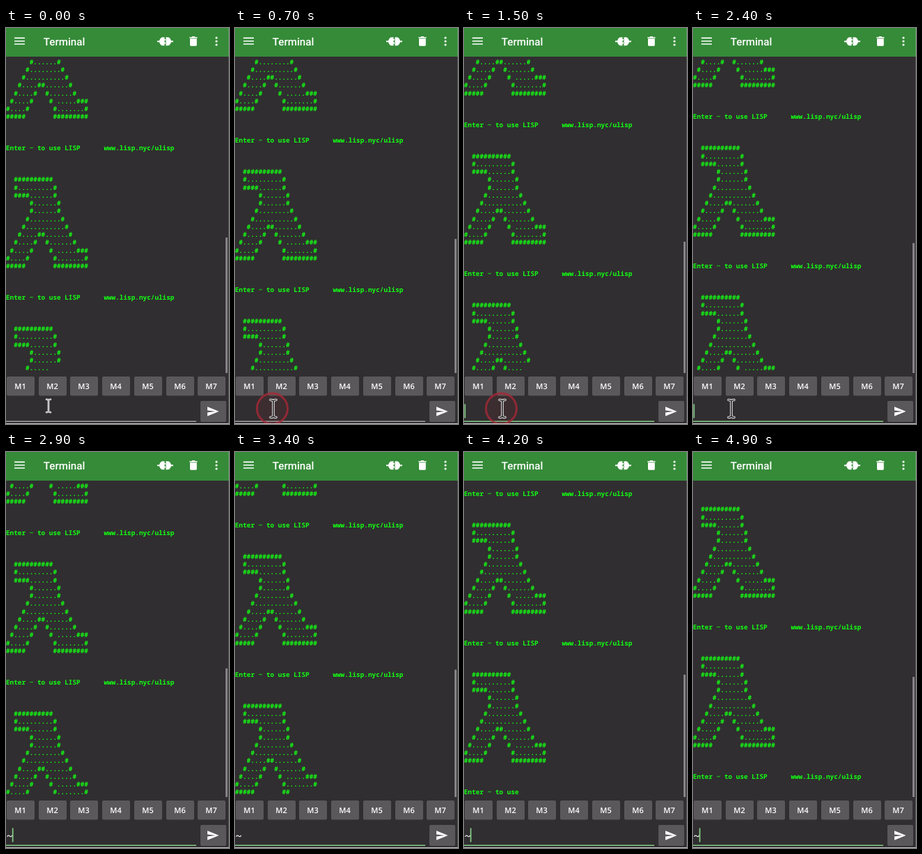
An HTML page that plays this animation: 320x567 px, repeating every 5000 ms.

```html
<!DOCTYPE html>
<html lang="en">
<head>
<meta charset="utf-8">
<title>Terminal</title>
<style>
  html, body { margin: 0; width: 100%; height: 100%; overflow: hidden; background: #302e30; }
  body { position: relative; }
  pre {
    position: absolute; left: 0; top: 42.6px; margin: 0; color: #14ff14;
    font: 600 9.375px/11.25px "Noto Sans Mono", "DejaVu Sans Mono", monospace;
    text-rendering: geometricPrecision;
  }
  svg { position: absolute; left: 0; top: 0; }
  text { fill: #fff; text-rendering: geometricPrecision; }
  #title { font: 500 15.2px Roboto, sans-serif; }
  #keys text { font: 600 11px "Open Sans", sans-serif; }
  #typed { font: 14px Roboto, sans-serif; }
</style>
</head>
<body>
<pre id="term"></pre>
<svg width="320" height="567" viewBox="0 0 320 567">
  <defs>
    <path id="beam" d="M-4-12.500q3.500 0 4 2q.5-2 4-2M0-10.500v21M-4 12.500q3.500 0 4-2q.5 2 4 2"/>
  </defs>
  <rect width="320" height="41" fill="#358b38"/>
  <g fill="#fff">
    <path d="M12 13.600h15v1.600H12zM12 17.900h15v1.600H12zM12 22.200h15v1.600H12z"/>
    <path d="M217 18.200h3q1.500-5 5-5h2.500v12H225q-3.500 0-5-5h-3zM240 18.200h-3q-1.500-5-5-5h-2.500v12H232q3.500 0 5-5h3zM227 16h3v1.800h-3zM227 20.600h3v1.800h-3z"/>
    <path d="M263.300 13h3l.8-1h3.600l.8 1h3v1.500h-11.200zM264 15.300h9.800v8.900q0 1.600-1.500 1.600h-6.800q-1.500 0-1.500-1.600z"/>
    <circle cx="302" cy="14" r="1.6"/><circle cx="302" cy="19" r="1.6"/><circle cx="302" cy="24" r="1.6"/>
  </g>
  <text id="title" x="53.700" y="25.200">Terminal</text>
  <rect id="bar" x="315" width="3" fill="#858385"/>
  <g id="keys"></g>
  <rect x="279" y="534" width="37" height="30" rx="2" fill="#5a585a"/>
  <path d="M289 542.200l16.500 6.800-16.500 6.800v-5.300l11.500-1.500-11.500-1.500z" fill="#fff"/>
  <rect id="line" y="562.500" height="1.500" width="273"/>
  <text id="typed" x="0.500" y="554">~</text>
  <rect id="caret" y="538.500" width="1.800" height="20" fill="#81c784"/>
  <circle id="ring" cx="53.500" cy="545" fill="#a82838" fill-opacity=".1" stroke="#a82838" stroke-opacity=".8" stroke-width="3"/>
  <g id="mouse" fill="none" stroke-linecap="round">
    <use href="#beam" stroke="#eee" stroke-width="3.600"/>
    <use id="core" href="#beam" stroke="#302e30" stroke-width="1.700"/>
  </g>
  <path d="M0 566h320v1H0z" fill="#ccc"/>
  <path d="M319 0h1v566h-1z" fill="#fff" opacity=".2"/>
</svg>
<script>
const $ = id => document.getElementById(id);
const set = (id, attrs) => Object.entries(attrs).forEach(([k, v]) => $(id).setAttribute(k, v));
const show = (id, on) => { $(id).style.display = on ? "" : "none"; };

const block = [
  "Enter ~ to use LISP      www.lisp.nyc/ulisp", "", "", "",
  "  ##########",
  "  #.........#",
  "  ####......#",
  "      #......#",
  "      #......#",
  "     #........#",
  "    #..........#",
  "   #....##......#",
  "  #....#  #......#",
  " #....#    # .....###",
  "#....#      #.......#",
  "#####       #########", "", "", ""
];

// Serial output as it arrives: time, last row, characters of that row
const arrivals = [
  [0, 9, 11], [100, 9, 13], [200, 9, 99], [500, 10, 99], [900, 11, 9], [1000, 11, 99],
  [1400, 12, 15], [1900, 12, 99], [2000, 13, 13], [2400, 13, 99], [2600, 14, 8],
  [2900, 14, 99], [3100, 15, 14], [3600, 16, 0], [4000, 18, 0], [4100, 19, 15],
  [4500, 19, 35], [4600, 21, 0]
];
const blinks = [1400, 1900, 2400, 3400, 3900, 4500, 4900];
const ROWS = 40;

for (let i = 0; i < 7; i++) {
  const x = Math.floor(1.2 + i * 45.8);
  $("keys").innerHTML += `<rect x="${x}" y="499" width="40" height="27.500" rx="2" fill="#5a585a"/>
    <text x="${x + 19.5}" y="517" text-anchor="middle">M${i + 1}</text>`;
}

function drawOutput(t) {
  const [, row, chars] = arrivals.filter(a => a[0] <= t).pop();
  const lines = Array.from({ length: ROWS }, (_, i) => block[(row - ROWS + 1 + i + 38) % 19]);
  lines[ROWS - 1] = lines[ROWS - 1].slice(0, chars);
  $("term").textContent = lines.join("\n");
  const height = 18160 / (84.6 + row);
  set("bar", { y: 494 - height, height });
}

function drawInput(t) {
  const typed = t >= 2800;
  set("line", { fill: t >= 1400 ? "#81c784" : "#a09ea0" });
  show("typed", typed);
  show("caret", blinks.filter(b => b <= t).length % 2);
  set("caret", { x: typed ? 8.8 : 0.5 });
}

function drawMouse(t) {
  const p = Math.min(1, Math.max(0, (t - 300) / 300));
  show("mouse", t < 2800);
  set("mouse", { transform: `translate(${61 - 6 * p} ${541 + 4 * p}) scale(${0.74 + 0.26 * p})` });
  set("core", { opacity: 0.3 + 0.7 * p });
  show("ring", t >= 500 && t < 2200);
  set("ring", { r: 22 * Math.min(1, (t - 300) / 400, (2400 - t) / 400), opacity: Math.min(1, (2300 - t) / 400) });
}

function frame(now) {
  const t = Math.floor(now % 5000 / 100) * 100;
  drawOutput(t);
  drawInput(t);
  drawMouse(t);
  requestAnimationFrame(frame);
}
frame(0);
</script>
</body>
</html>
```
